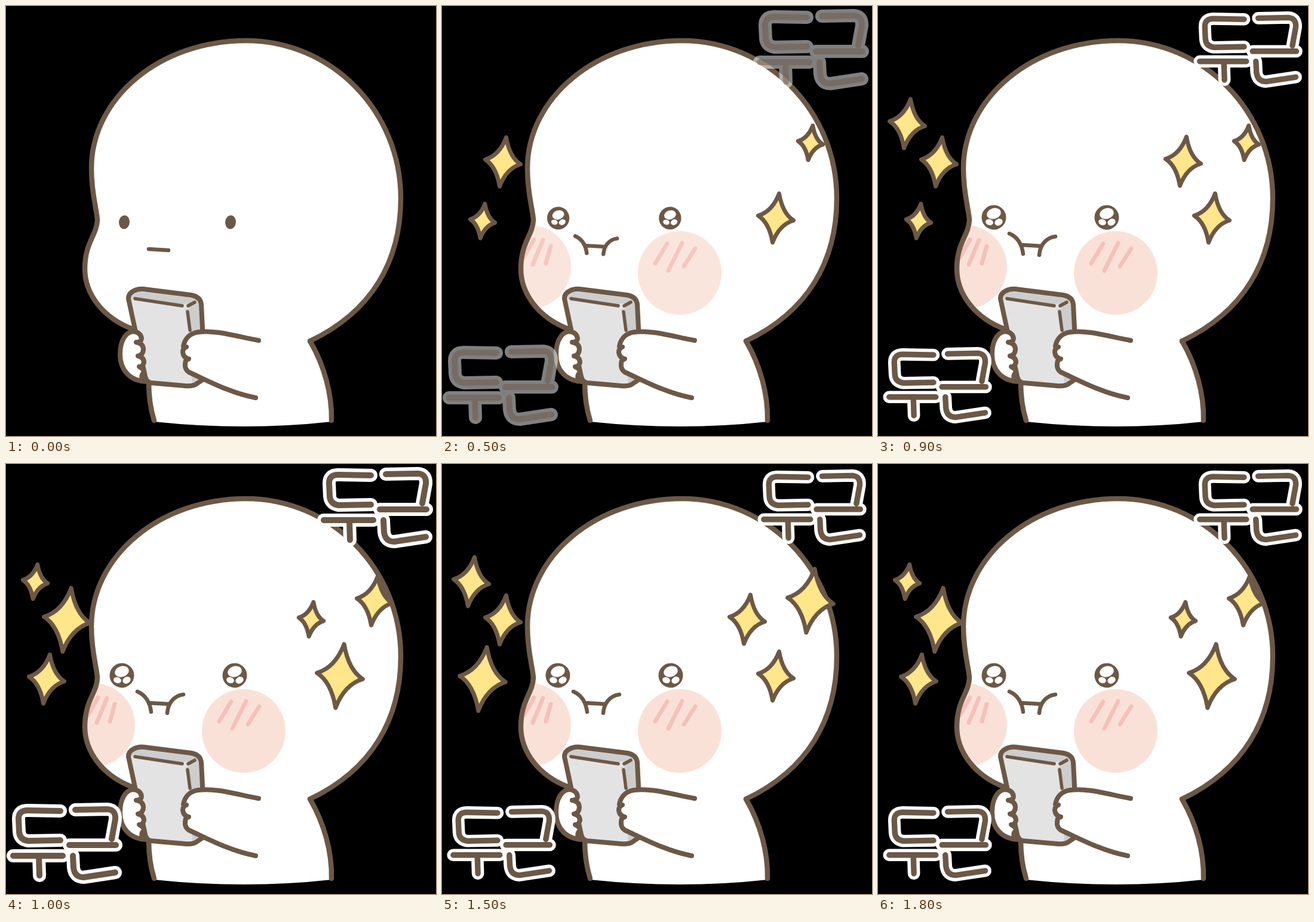
Recreate the animation shown at these times as an HTML page with a canvas. Size 720 by 720 pixels, loop 1900 ms.

```html
<!DOCTYPE html>
<html lang="ko">
<head>
<meta charset="utf-8">
<title>두근두근</title>
<style>
  html, body { margin: 0; width: 100%; height: 100%; overflow: hidden; background: #000; }
  canvas { display: block; width: 100vw; height: 100vh; }
</style>
</head>
<body>
<canvas id="stage" width="720" height="720"></canvas>
<script>
const ctx = document.getElementById('stage').getContext('2d');
const LOOP = 1900, STEP = 100, REST_STEPS = 3;
const BROWN = '#6c5846', WHITE = '#fff', YELLOW = '#ffe68a';
const BLUSH = '#fae1d7', BLUSH_LINE = '#f6c0ba', PHONE = '#e3e3e3', PHONE_SIDE = '#cdcdcd';

const path = d => new Path2D(d);
const HEAD = path('M212 541C162 522 132 482 132 440C132 396 152 384 153 358C152 340 143 315 143 272C143 154 258 58 402 58C545 58 661 176 661 322C661 428 612 512 509 561');
const BODY = path('M509 561C535 605 545 650 545 696Q400 712 248 696C242 675 239 650 239 630V490Z');
const BODY_LINES = path('M509 561C533 602 546 650 545 694M239 630C239 650 242 675 248 694');

const PHONE_BACK = path('M205 490Q205 481 214 477Q221 473 231 474L310 484Q326 487 327 500L330 560L329 626L317 634Q311 637 300 636L243 631Q235 630 233 620Z');
const PHONE_FRONT = path('M207 489L299 503L307 545L312 633L243 629L232 620Z');
const PHONE_EDGES = path('M216 490L295 502M304 512L308 543M305 502L316 496');

const LEFT_HAND = path('M238 629C208 629 191 610 191 583C191 560 201 545 214 545Q226 547 227 557Q226 563 218 563Q230 565 230 575Q229 585 221 586Q231 588 231 597Q229 604 223 604Q232 608 231 614Q225 618 229 627');
const ARM = path('M423 560C385 553 350 542 322 546C307 548 299 558 297 570L302 571Q296 573 296 580Q297 589 306 591Q300 592 300 599Q299 608 306 613C335 626 375 648 418 656');

const STAR_POINTS = [[5.5, -41], [11, -8], [29.5, 4], [6, 11]];
const WORD = path('M611 19L556 18Q541 18 541 32L542 54Q543 67 557 69L611 68M532 94L615 94M575 95L576 127M636 17L690 16Q704 17 703 33L697 66M626 76L704 76M632 94L633 114Q635 130 650 130L703 122');

// Each sparkle starts at its smallest and pulses over four steps.
const STARS = [
  { x: 102, y: 261, start: 1 }, { x: 559, y: 355, start: 1 },
  { x: 68, y: 360, start: 2 }, { x: 617, y: 229, start: 2 },
  { x: 49, y: 197, start: 3 }, { x: 511, y: 260, start: 3 }
];

const lerp = (a, b, p) => a + (b - a) * p;

function fill(shape, color) {
  ctx.fillStyle = color;
  ctx.fill(shape);
}

function stroke(shape, width, color = BROWN) {
  ctx.strokeStyle = color;
  ctx.lineWidth = width;
  ctx.stroke(shape);
}

function oval(x, y, rx, ry, color, turn = 0) {
  ctx.beginPath();
  ctx.ellipse(x, y, rx, ry, turn, 0, Math.PI * 2);
  ctx.fillStyle = color;
  ctx.fill();
}

function drawBlush(p) {
  ctx.save();
  ctx.clip(HEAD);
  ctx.globalAlpha = p;
  oval(146, 437, 70, 70, BLUSH);
  oval(398, 447, 70, 70, BLUSH);
  stroke(path('M377 398L357 431M402 397L379 443M424 406L405 436M154 391L137 421M169 392L152 433M182 402L174 431'), 7, BLUSH_LINE);
  ctx.restore();
}

function drawEye(x0, x1, p) {
  const x = lerp(x0, x1, p), y = lerp(362, 354, p);
  const rx = lerp(9, 20.5, p), ry = lerp(11.5, 20.5, p);
  oval(x, y, rx, ry, BROWN, 0.1);
  if (!p) return;
  ctx.save();
  ctx.translate(x, y);
  ctx.scale(p, p);
  oval(0, -6.5, 12, 9, WHITE, -0.3);
  oval(-7.5, 8, 6.5, 5, WHITE, 0.3);
  oval(8, 8, 7, 5.5, WHITE, -0.5);
  ctx.restore();
}

function drawMouth(p) {
  const left = 239, right = lerp(272, 274, p), y = lerp(407, 400, p);
  const mouth = path(`M${left} ${y}L${right} ${y + 2}`);
  if (p) {
    const pt = (x, dx, dy) => `${x + dx * p} ${y + dy * p} `;
    mouth.addPath(path('M' + pt(left, -19, -19) + 'C' + pt(left, -5, -13) + pt(left, 2, 0) + pt(left, 4, 15)));
    mouth.addPath(path('M' + pt(right, 23, -14) + 'C' + pt(right, 6, -12) + pt(right, -3, 2) + pt(right, -4, 17)));
  }
  stroke(mouth, 6.5);
}

function drawPhone() {
  fill(PHONE_BACK, PHONE_SIDE);
  fill(PHONE_FRONT, PHONE);
  oval(302, 503, 6, 5, PHONE);
  stroke(PHONE_EDGES, 5.5);
  stroke(PHONE_BACK, 8);
  for (const hand of [LEFT_HAND, ARM]) {
    fill(hand, WHITE);
    stroke(hand, 8);
  }
}

function drawStar({ x, y, start }, k) {
  if (k < start) return;
  const size = 1 - 0.3 * Math.cos((k - start) * Math.PI / 2);
  const pts = [...STAR_POINTS, ...STAR_POINTS.map(([a, b]) => [-a, -b])]
    .map(([a, b]) => [x + a * size, y + b * size]);
  const star = new Path2D();
  star.moveTo(...pts[0]);
  for (let i = 1; i < 8; i += 2) star.quadraticCurveTo(...pts[i], ...pts[(i + 1) % 8]);
  star.closePath();
  fill(star, YELLOW);
  stroke(star, 7);
}

function drawWord(dx, dy, k) {
  const scale = k % 3 === 0 ? 0.94 : 1;
  ctx.save();
  ctx.globalAlpha = Math.min(1, k / 4);
  ctx.translate(645 + dx, 73 + dy);
  ctx.scale(scale, scale);
  ctx.translate(-645, -73);
  stroke(WORD, 22, WHITE);
  stroke(WORD, 10);
  ctx.restore();
}

function draw(time) {
  const k = Math.floor(time % LOOP / STEP) - REST_STEPS;
  const x = Math.min(1, Math.max(0, (k + 1) / 5));
  const mood = k < 0 ? 0 : 1 - (1 - x) ** 2;

  ctx.fillStyle = '#000';
  ctx.fillRect(0, 0, 720, 720);
  ctx.lineCap = ctx.lineJoin = 'round';

  fill(BODY, WHITE);
  fill(HEAD, WHITE);
  if (mood) drawBlush(mood);
  stroke(HEAD, 8.5);
  stroke(BODY_LINES, 8.5);
  drawEye(198, 194, mood);
  drawEye(376, 383, mood);
  drawMouth(mood);
  drawPhone();

  for (const star of STARS) drawStar(star, k);
  if (k > 0) {
    drawWord(0, 0, k);
    drawWord(-520, 562, k);
  }
}

let origin;
function tick(now) {
  origin ??= now;
  draw(now - origin);
  requestAnimationFrame(tick);
}
draw(0);
requestAnimationFrame(tick);
</script>
</body>
</html>
```
